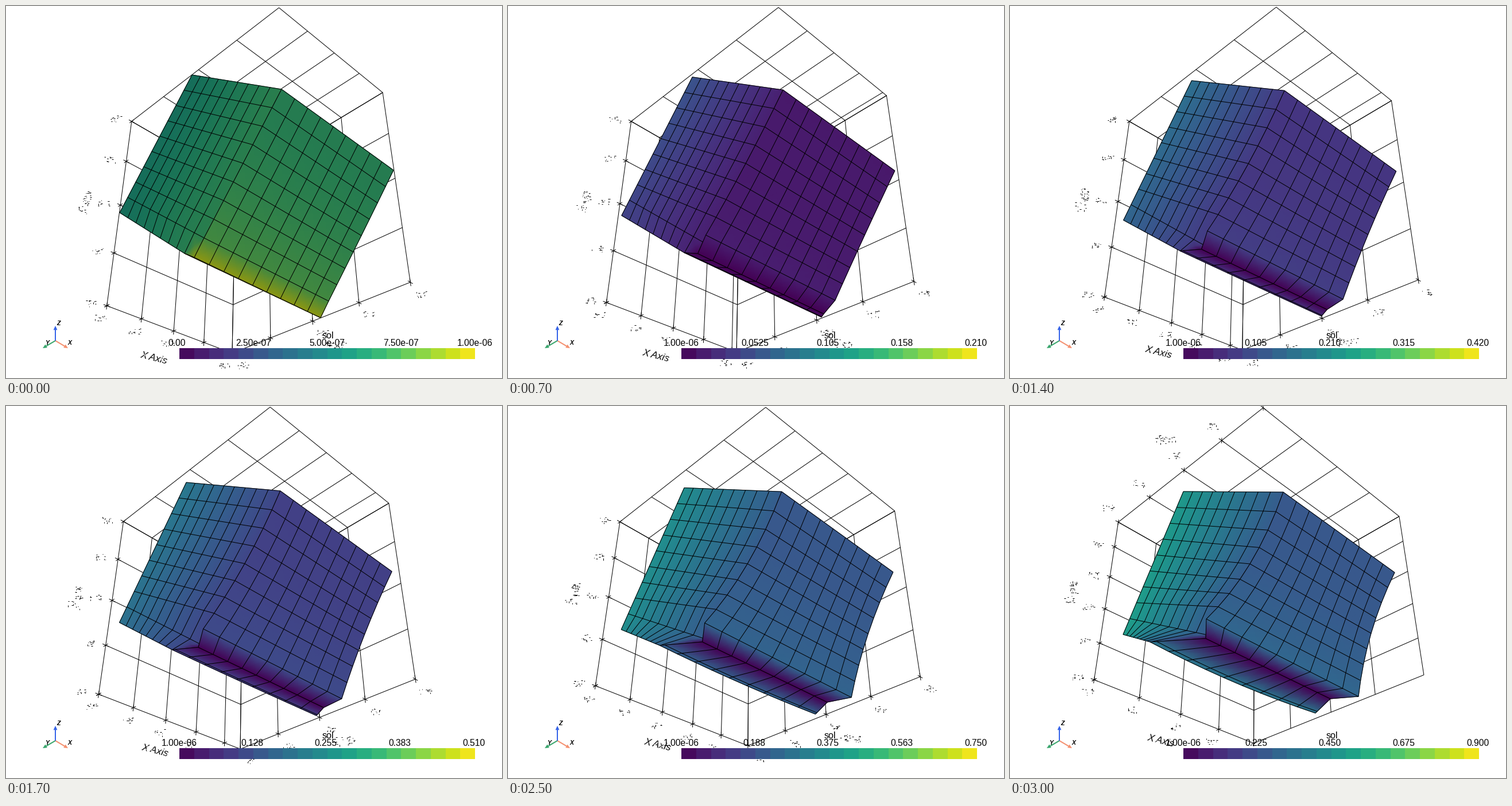
Animation, 864 px wide and 648 px high, one loop 3100 ms. Source, as a matplotlib script:

```python
import numpy as np
import matplotlib.pyplot as plt
from matplotlib.animation import FuncAnimation
from matplotlib.collections import LineCollection
from matplotlib.colors import ListedColormap

W, H, DPI = 864, 648, 100
FRAMES, STEP_MS = 31, 100
PX = 72 / DPI
FLIP = 28        # from here on the axes pick other edges and tick steps
CELLS = 9
T = np.linspace(0, 1, CELLS + 1)
NEAR = T + .07 * T * (1 - T)     # foreshortened column spacing, right face
FAR = T - .17 * T * (1 - T)      # the same on the left face

VIRIDIS = plt.get_cmap("viridis")
SHADED = ListedColormap(VIRIDIS(np.linspace(0, 1, 256)) * [0.67, 0.67, 0.67, 1])
BANDS = ListedColormap(VIRIDIS((np.arange(20) + .5) / 20))

fig = plt.figure(figsize=(W / DPI, H / DPI), dpi=DPI, facecolor="white")
ax = fig.add_axes([0, 0, 1, 1])


def lines(segs, z, width=1.0, color="black"):
    ax.add_collection(LineCollection(segs, colors=color, linewidths=width * PX,
                                     zorder=z, capstyle="butt"))


def label(x, y, s, size, z=9, **kw):
    ax.text(x, y, s, fontsize=size * PX, family="Liberation Sans", zorder=z, **kw)


def move(start, end, s, power=1.4):
    """Point on the way from start to end, slow at first."""
    return np.array(start) + (np.array(end) - np.array(start)) * s ** power


def mix(a, b, w):
    """Blend points a and b with weights w."""
    w = np.asarray(w)[..., None]
    return a * (1 - w) + b * w


def curve(a, b, c):
    """Nine points on the parabola through a, b and c."""
    t = np.linspace(0, 1, CELLS)[:, None]
    return (a * (1 - t) * (1 - 2 * t) + b * 4 * t * (1 - t)
            + c * t * (2 * t - 1))


def patch(pts, values, cmap, z):
    """A smooth coloured face with its cell edges."""
    ax.pcolormesh(pts[..., 0], pts[..., 1], values, shading="gouraud",
                  cmap=cmap, vmin=0, vmax=1, zorder=z)
    lines(list(pts) + list(pts.transpose(1, 0, 2)), z + 0.1)


def field(s):
    """Values on left edge (top, bottom), right face (top, bottom), fold, rim."""
    if s == 0:
        return .58, .58, .67, .76, .93, .93
    right = np.clip(.37 * s - .02, .05, .27)
    rim = max(.48 * s - .08, 0)
    return .54 * s ** .5, .56 * s ** .7, right, right + .06 * s, 0, rim


def draw_block(s):
    cmap = SHADED if s == 0 else VIRIDIS
    left_hi, left_lo, right_hi, right_lo, fold_val, rim_val = field(s)

    left_top = move((324, 120), (302, 149), s)
    left_bottom = move((198, 360), (197, 398), s)
    fold_start = move((328, 438), (341, 405), s, 1.1)
    fold_end = move((548, 543), (558, 510), s, 1.1)
    rim_start = move((311, 431), (244, 411), s, 2)
    rim_end = move((548, 543), (532, 535), s)
    spine = curve(move((480, 145), (476, 150), s, 1),
                  move((413, 274), (418, 275), s, 1),
                  move((345, 404), (342, 371), s, 1.3))
    right = curve(move((675, 286), (670, 290), s, 1),
                  move((619, 400), (629, 396), s, 1),
                  move((562, 514), (607, 506), s, 1.2))
    fold = mix(fold_start, fold_end, NEAR)

    # left face
    outer = mix(left_top, left_bottom, T)
    inner = np.vstack([spine, fold_start])
    inner[-2] = mix(spine[-1], fold_start, .8 * min(1, 2 * s))
    face = np.array([mix(a, b, FAR) for a, b in zip(outer, inner)])
    face[-1, :-1] = mix(left_bottom, rim_start, np.linspace(0, 1, CELLS))
    edge = left_hi + (left_lo - left_hi) * T
    vals = edge[:, None] * (1 - T) + (right_hi + .02) * T
    vals[-1, -1] = fold_val
    patch(face, vals, cmap, 3)

    # underside
    rim = mix(rim_start, rim_end, T)
    rim[:, 1] += 28 * T * (1 - T) * s ** 4
    vals = np.outer([fold_val, rim_val], np.ones(T.size))
    patch(np.array([fold, rim]), vals, cmap, 4)
    lines([mix(fold, rim, np.full(T.size, .88))], 4.1)

    # right face
    near = np.vstack([spine, fold_start])
    far = np.vstack([right, fold_end])
    face = np.array([mix(a, b, NEAR) for a, b in zip(near, far)])
    rows = right_hi + (right_lo - right_hi) * (T * CELLS / 8) ** 2
    vals = np.outer(rows, np.ones(T.size))
    vals[-1] = fold_val
    patch(face, vals, cmap, 5)


def projector(a, c):
    """Isometric view from below, framed on the box."""
    dist = np.sqrt(a * a + 1 + c * c) / np.sin(np.radians(15))
    focal = H / 2 / np.tan(np.radians(15))
    s2, s3, s23 = np.sqrt(2), np.sqrt(3), np.sqrt(2 / 3)

    def project(x, y, z):
        right, ahead = (x + y) / s2, (x - y) / s2
        depth = dist + s23 * ahead + z / s3
        up = s23 * z - ahead / s3
        return np.array([W / 2 + focal * right / depth, H / 2 - focal * up / depth])
    return project


def speckle(rng, x, y, n, w, h, color="black"):
    """Broken, unreadable lettering."""
    px = np.round(x + rng.uniform(-w / 2, w / 2, n))
    py = np.round(y + rng.uniform(-h / 2, h / 2, n)) + .5
    tall = rng.random(n) < .4
    size = rng.uniform(1, 3.5, n)
    segs = [[(u, v), (u + (0 if t else d), v + (d if t else 0))]
            for u, v, t, d in zip(px, py, tall, size)]
    lines(segs, 2, color=color)


def draw_axes(i, s):
    # half sizes along x and z; y stays 1
    a, c = move((.71, 1), (.94, .87), s)
    proj = projector(a, c)
    rng = np.random.default_rng(i + 5)
    late = i >= FLIP
    k = np.arange(5)
    xs = -a + 2 * a * k * (.25 if late else .25 * .71 / a)
    ys = np.linspace(-1, 1, 5)
    zs = -c + 2 * c * k * (1 / 4.87 if late else .25)

    segs = []
    for x in np.unique(np.round([*xs, a], 4)):
        segs.append([proj(x, -1, -c), proj(x, -1, c), proj(x, 1, c)])
    for y in ys:
        segs.append([proj(-a, y, c), proj(a, y, c), proj(a, y, -c)])
    for z in np.unique(np.round([*zs, c], 4)):
        segs.append([proj(-a, -1, z), proj(a, -1, z), proj(a, 1, z)])

    def ticks(points, dirs, offset):
        for p in points:
            for d in dirs:
                e = .033 * d
                segs.append([proj(*(np.array(p) - e)), proj(*(np.array(p) + e))])
            x, y = proj(*p) + offset
            speckle(rng, x, y, 11, 20, 11)

    ex, ey, ez = np.eye(3)
    ticks([(x, -1, -c) for x in xs], (ey, ez), (-12, 20))
    ticks([(-a, -1, z) for z in zs], (ex, ey), (-29, -5))
    if late:
        ticks([(-a, y, c) for y in ys], (ex, ez), (-18, -26))
        tx, ty = proj(-a, 0, c) + (-32, -55)
    else:
        ticks([(a, y, -c) for y in ys], (ex, ez), (17, 20))
        tx, ty = proj(a, 0, -c) + (42, 40)
    lines(segs, 1)

    speckle(rng, tx, ty, 24, 38, 14)
    x, y = proj(-a, -1, 0) + (-62, -5)
    speckle(rng, x + 3, y - 9, 24, 13, 22)
    speckle(rng, x - 5, y + 12, 10, 20, 14)
    x, y = proj(0, -1, -c) + (-35, 47)
    label(x, y, "X Axis", 17, 1.5, style="italic", rotation=-14,
          ha="center", va="center")
    speckle(rng, x, y, 34, 48, 20, "white")


def draw_triad():
    o = np.array([86, 583])
    for tip, color in (((22, 13), "#f4906f"), ((-22, 13), "#38a56c"),
                       ((0, -26), "#3563e8")):
        tip = np.array(tip)
        base, side = o + tip * .72, np.array([-tip[1], tip[0]]) * .13
        lines([[o, base]], 6, 2, color)
        ax.fill(*np.transpose([o + tip, base + side, base - side]),
                color=color, lw=0, zorder=6)
    for x, y, s in ((91, 553, "Z"), (111, 587, "X"), (72, 587, "Y")):
        label(x, y, s, 10.5, weight="bold", style="italic",
              ha="center", va="center")


def draw_bar(i):
    x0, x1 = 302, 817
    ax.pcolormesh(np.linspace(x0, x1, 21), [596, 615], np.arange(20)[None],
                  cmap=BANDS, zorder=7)
    low, high = (1e-6, .03 * i) if i else (0, 1e-6)
    for t in np.linspace(0, 1, 5):
        s = f"{low + (high - low) * t:#.3g}"
        shift = -2.3 * max(0, 6 - len(s))    # padded to six characters
        label(x0 + (x1 - x0) * t + shift, 591.5, s, 15.6,
              ha="center", va="baseline")
    label(561, 579, "sol", 16, ha="center", va="baseline")


def update(i):
    s = i / (FRAMES - 1)
    ax.clear()
    ax.axis("off")
    draw_axes(i, s)
    draw_block(s)
    draw_triad()
    draw_bar(i)
    ax.set(xlim=(0, W), ylim=(H, 0))
    return []


anim = FuncAnimation(fig, update, frames=FRAMES, interval=STEP_MS,
                     init_func=lambda: [], repeat=True, repeat_delay=0)
plt.show()
```
